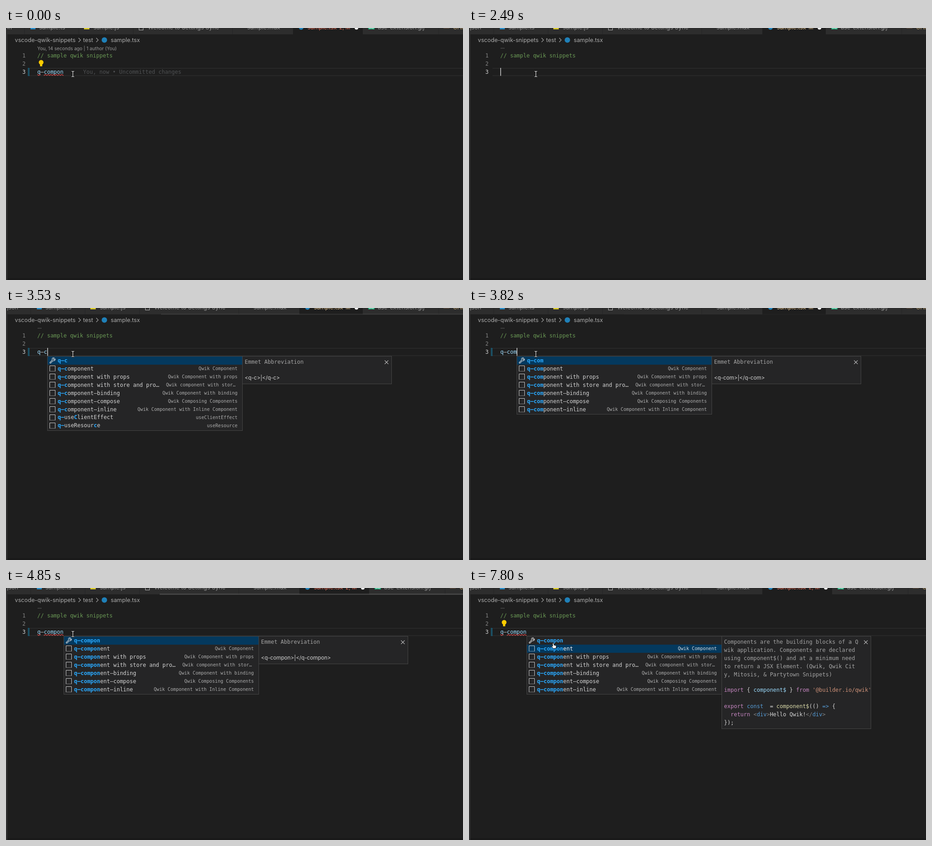
Animation of 1008x556 px, one loop 8 s. Source, as an HTML page with a canvas:

```html
<!DOCTYPE html>
<html lang="en">
<head>
<meta charset="utf-8">
<title>Snippet completion</title>
<style>
html, body { margin: 0; width: 100%; height: 100%; overflow: hidden; background: #1e1e1e; }
canvas { display: block; }
</style>
</head>
<body>
<canvas id="stage" width="1008" height="556"></canvas>
<script>
const ctx = document.getElementById('stage').getContext('2d');
const LOOP = 8000;
const CH = 7.224, LEFT = 69, ROW = 17.95;
const MONO = '12px "DejaVu Sans Mono", monospace';
const BOLD = 'bold ' + MONO;
const DETAIL = '10.2px "DejaVu Sans Mono", monospace';
const ui = (size, style = '') => `${style} ${size}px Inter, sans-serif`;
const SLIDER = 'rgba(121,121,121,0.4)';
const WORD = 'q-compon';

// [time, value] pairs; the latest one not after t holds.
const typedSteps = [[0, 8], [900, 7], [1040, 6], [1180, 5], [1330, 4], [1470, 3], [1610, 2],
  [1900, 1], [2200, 0], [3080, 1], [3380, 2], [3520, 3], [3670, 4], [3820, 5], [3970, 6],
  [4110, 7], [4410, 8]];
const caretSteps = [[0, 0], [600, 1], [2640, 0], [3080, 1], [4850, 0], [5440, 1], [5880, 0],
  [6330, 1], [6920, 0], [7360, 1], [7800, 0]];
const at = (steps, t) => steps.reduce((v, s) => (t >= s[0] ? s[1] : v), 0);
const during = (t, a, b) => t >= a && t < b;

const completions = [
  ['queueMicrotask', ''],
  ['q-$', '$ hook'],
  ['q-component', 'Qwik Component'],
  ['q-component with props', 'Qwik Component with props'],
  ['q-component with store and pro…', 'Qwik component with stor…'],
  ['q-component-binding', 'Qwik Component with binding'],
  ['q-component-compose', 'Qwik Composing Components'],
  ['q-component-inline', 'Qwik Component with Inline Component'],
  ['q-useClientEffect', 'useClientEffect'],
  ['q-useResource', 'useResource'],
  ['q-useServerMount', 'useServerMount'],
  ['q-useStore', 'useStore']
];

const KEY = '#c586c0', PLAIN = '#d4d4d4', BLUE = '#569cd6', TAG = '#808080';
const docText = [
  'Components are the building blocks of a Q',
  'wik application. Components are declared',
  'using component$() and at a minimum need',
  'to return a JSX Element. (Qwik, Qwik Cit',
  'y, Mitosis, & Partytown Snippets)'
];
const docCode = [
  [['import', KEY], [' { ', PLAIN], ['component$', '#9cdcfe'], [' } ', PLAIN], ['from', KEY],
    [" '@builder.io/qwik'", '#ce9178']],
  [],
  [['export', KEY], [' const', BLUE], ['  = ', PLAIN], ['component$', '#dcdcaa'], ['(() ', PLAIN],
    ['=>', BLUE], [' {', PLAIN]],
  [['  return', KEY], [' <', TAG], ['div', BLUE], ['>', TAG], ['Hello Qwik!', PLAIN], ['</', TAG],
    ['div', BLUE], ['>', TAG]],
  [['});', PLAIN]]
];

function text(str, x, y, color, font = MONO, align = 'left') {
  ctx.font = font;
  ctx.fillStyle = color;
  ctx.textAlign = align;
  ctx.fillText(str, x, y);
}
// Code is set with a wide hyphen that fills its cell.
const wide = str => str.replace(/-/g, '–');

function box(x, y, w, h, color) {
  ctx.fillStyle = color;
  ctx.fillRect(x, y, w, h);
}
function disc(x, y, r, color) {
  ctx.fillStyle = color;
  ctx.beginPath();
  ctx.arc(x, y, r, 0, Math.PI * 2);
  ctx.fill();
}
function line(points, color, width = 1) {
  ctx.strokeStyle = color;
  ctx.lineWidth = width;
  ctx.beginPath();
  points.forEach(([x, y], i) => (i ? ctx.lineTo(x, y) : ctx.moveTo(x, y)));
  ctx.stroke();
}
function panel(x, y, w, h) {
  box(x, y, w, h, '#252526');
  ctx.strokeStyle = '#454545';
  ctx.lineWidth = 1;
  ctx.strokeRect(x + 0.5, y + 0.5, w - 1, h - 1);
}
function clipped(x, y, w, h, draw) {
  ctx.save();
  ctx.beginPath();
  ctx.rect(x, y, w, h);
  ctx.clip();
  draw();
  ctx.restore();
}
function runs(x, y, parts) {
  for (const [str, color] of parts) {
    text(wide(str), x, y, color);
    x += str.length * CH;
  }
}

function drawTabs(t) {
  const errors = !during(t, 2490, 4700);
  const shift = t < 2490 ? 0 : 14;
  const rest = errors ? shift : shift - 14;
  const grey = '#969696', base = 2.8, font = ui(12.7), height = 14;
  box(0, 0, 1008, height, '#2d2d2d');
  [40, 160, 280, 499].forEach(x => box(x + shift, 0, 1, height, '#252526'));
  box(954 + rest, 0, 1, height, '#252526');
  box(633 + shift, 0, 154 + rest - shift, height, '#1e1e1e');

  text('package.json', 13 + shift, base, grey, font, 'right');
  box(54 + shift, 0, 11, 3, '#2a8ac4');
  text('sample.ts', 73 + shift, base, grey, font);
  box(172 + shift, 0, 12, 3, '#d8c92c');
  text('sample.js', 193 + shift, base, grey, font);
  ctx.strokeStyle = '#b5b5b5';
  ctx.lineWidth = 1;
  ctx.strokeRect(293.5 + shift, -5.5, 9, 10);
  text('Welcome to Settings Sync', 313 + shift, base, grey, font);
  text('sample.mdx', 532 + shift, base, grey, font);

  const active = errors ? '#e8725c' : '#e2c08d';
  disc(651 + shift, -1, 5, '#1f80b8');
  text('sample.tsx', 665 + shift, base, active, font);
  text(errors ? '2, M' : 'M', 735 + shift, base, active, ui(11.7));
  disc(773 + rest, -0.5, 4, '#f0f0f0');
  box(799 + rest, 0, 14, 3, '#20a878');
  line([[801 + rest, 1.5], [805 + rest, 0], [811 + rest, 1.5]], '#d9f3e9');
  text('use-extension.gif', 820 + rest, base, grey, ui(12.7, 'italic'));
  box(965 + rest, 0, 13, 1, '#6b5340');
  text('CHANGELOG.md', 986 + rest, base, '#b79c6d', font);

  const fade = start => Math.max(0, Math.min(1, 1 - (t - start) / 750));
  ctx.globalAlpha = during(t, 2640, 4700) ? fade(3140) : t >= 4700 ? fade(5130) : 0;
  box(errors ? 339 : 342, 12.5, 670, 2.5, SLIDER);
  ctx.globalAlpha = 1;
}

function drawBreadcrumb() {
  const grey = '#a9a9a9', font = ui(12.7);
  text('vscode-qwik-snippets', 19.5, 31, grey, font);
  text('test', 170, 31, grey, font);
  text('sample.tsx', 231, 31, grey, font);
  for (const x of [160, 199]) line([[x, 22], [x + 4.5, 26.5], [x, 31]], grey, 1.1);
  disc(217, 26.5, 6, '#1f80b8');
}

function squiggle(from, to) {
  clipped(from, 100, to - from, 7, () => {
    const points = [];
    for (let x = 66; x < 132; x += 3) points.push([x, x % 2 ? 102.4 : 104.8]);
    line(points, '#f14c4c', 1.1);
  });
}

function drawBulb() {
  disc(77.5, 75.7, 5.2, '#ffcc00');
  box(75, 79, 5, 5.5, '#ffcc00');
}

function drawEditor(t, count) {
  if (t < 2350) text('You, 14 seconds ago | 1 author (You)', LEFT, 48.5, '#999999', ui(10.2));
  else for (let i = 0; i < 3; i++) box(70.5 + i * 3, 44, 1.2, 1.2, '#999999');

  for (const y of [88, 104.2]) box(52, y, 956, 1.8, '#2a2a2a');
  [65, 83, 101].forEach((y, i) =>
    text(i + 1, 43.3, y, i === 2 ? '#d0d0d0' : '#858585', MONO, 'right'));
  text('// sample qwik snippets', LEFT, 65, '#6a9955');

  if (!during(t, 2350, 3230)) {
    clipped(48, 88, 4, 18, () => {
      for (let y = 84; y < 112; y += 3) line([[47, y + 4], [53, y - 2]], '#1b81a8', 1.2);
    });
  }
  const word = WORD.slice(0, count);
  runs(LEFT, 101, [[word.slice(0, 1), '#9cdcfe'], [word.slice(1, 2), PLAIN], [word.slice(2), '#9cdcfe']]);
  if (count && !during(t, 2200, 4700)) {
    squiggle(LEFT, LEFT + CH);
    if (count > 1) squiggle(83.5, Math.max(87, LEFT + count * CH));
  }
  if (t < 900) text('You, now • Uncommitted changes', 170, 101, '#4f5153');
  if (t < 900 || t >= 5290) drawBulb();
  if (at(caretSteps, t)) box(Math.round(LEFT + count * CH), 88, 1.5, 17.5, '#d0d0d0');
}

function snippetIcon(x, y) {
  line([[x + 0.5, y + 12], [x + 0.5, y + 0.5], [x + 12.5, y + 0.5], [x + 12.5, y + 12]], '#cccccc');
  for (let i = 0; i < 13; i += 2) box(x + i, y + 12, 1, 1, '#cccccc');
}
function cubeIcon(x, y) {
  const c = '#b180d7';
  line([[x + 6, y], [x + 12, y + 3], [x + 12, y + 10], [x + 6, y + 13], [x, y + 10], [x, y + 3],
    [x + 6, y], [x + 12, y + 3], [x + 6, y + 6], [x, y + 3]], c, 1.1);
  line([[x + 6, y + 6], [x + 6, y + 13]], c, 1.1);
}
function wrenchIcon(x, y) {
  line([[x + 9.5, y + 0.8], [x + 7, y + 1], [x + 5.5, y + 3.5], [x + 6, y + 6], [x + 0.8, y + 11],
    [x + 0.8, y + 12.4], [x + 2.5, y + 12.6], [x + 7.5, y + 7.5], [x + 10.5, y + 7.5],
    [x + 12.6, y + 5.2], [x + 12.4, y + 3.3], [x + 10, y + 5.4], [x + 8.2, y + 3.8],
    [x + 10.5, y + 1.5], [x + 9.5, y + 0.8]], '#dddddd', 1.1);
}

// Indices of the label's letters matched in order, or null.
function fuzzy(label, query) {
  const hits = [];
  let from = 0;
  for (const c of query) {
    const i = label.toLowerCase().indexOf(c, from);
    if (i < 0) return null;
    hits.push(i);
    from = i + 1;
  }
  return hits;
}

function drawRow(x, r, [label, detail], query, selected) {
  const top = 107 + r * ROW, base = 119.8 + r * ROW;
  if (selected) box(x + 1, top, 429, 18, '#04395e');
  const icon = r === 0 ? wrenchIcon : label === 'queueMicrotask' ? cubeIcon : snippetIcon;
  icon(x + 5, Math.round(top + 2));
  const hits = fuzzy(label, query);
  [...wide(label)].forEach((c, i) => {
    const hit = hits.includes(i);
    text(c, x + 23 + i * CH, base, hit ? '#2aaaff' : selected ? '#ffffff' : PLAIN, hit ? BOLD : MONO);
  });
  const right = x + (detail.endsWith('…') ? 415.3 : 419.7);
  text(detail, right, base - 0.4, selected ? '#d6dde3' : '#acacac', DETAIL, 'right');
}

function drawDocs(x, query, full, slider) {
  const left = x + 5.5;
  panel(x, 106, 330, full ? 205 : 62);
  if (full) {
    docText.forEach((str, i) => text(str, left, 123.3 + i * 18, '#a5a5a5'));
    clipped(x, 200, 329, 110, () => {
      docCode.forEach((parts, i) => runs(left, 229.3 + i * 18, parts));
      if (slider) box(x + 1, 300, 311, 10, SLIDER);
    });
  } else {
    text('Emmet Abbreviation', left, 123.3, '#a5a5a5');
    text(`<${query}>|</${query}>`, left, 158, '#d4d4d4', ui(11.7));
  }
  const cx = x + 318.3, cy = 119.7;
  line([[cx - 4, cy - 4], [cx + 4, cy + 4]], '#cccccc', 1.1);
  line([[cx + 4, cy - 4], [cx - 4, cy + 4]], '#cccccc', 1.1);
}

function drawSuggest(t, count) {
  const query = WORD.slice(0, count);
  const x = Math.round(LEFT + count * CH);
  const matches = completions.filter(([label]) => fuzzy(label, query));
  const rows = [[query, ''], ...matches].slice(0, 12);
  const browsing = t >= 6330;
  panel(x, 106, 431, Math.round(rows.length * ROW + 3));
  rows.forEach((row, r) => drawRow(x, r, row, query, r === (browsing ? 1 : 0)));
  if (matches.length > 11) box(x + 420, 107, 10, 32, SLIDER);
  drawDocs(x + 430, query, browsing, t < 7360);
}

function drawIBeam(x, y) {
  const stroke = (color, w) => {
    line([[x - 3, y - 6], [x - 1, y - 6], [x, y - 5], [x + 1, y - 6], [x + 3, y - 6]], color, w);
    line([[x, y - 5], [x, y + 5]], color, w);
    line([[x - 3, y + 6], [x - 1, y + 6], [x, y + 5], [x + 1, y + 6], [x + 3, y + 6]], color, w);
  };
  stroke('#111111', 3);
  stroke('#e6e6e6', 1.2);
}
function drawHand(x, y) {
  ctx.fillStyle = '#ffffff';
  ctx.strokeStyle = '#111111';
  ctx.lineWidth = 1;
  ctx.beginPath();
  [[-3, -5], [-1.5, -6], [0, -4], [0.5, -1.5], [4, -0.8], [5.5, 0.5], [5, 4], [4, 6], [-1, 6],
    [-3, 3.5], [-5, 0.8], [-4, 0], [-2, 1]].forEach(([dx, dy]) => ctx.lineTo(x + dx, y + dy));
  ctx.closePath();
  ctx.fill();
  ctx.stroke();
}

function draw(t) {
  const count = at(typedSteps, t);
  box(0, 0, 1008, 556, '#1e1e1e');
  drawTabs(t);
  drawBreadcrumb();
  drawEditor(t, count);
  box(0, 0, 3, 556, '#303031');
  box(3, 552, 1005, 4, '#191919');
  if (t >= 3080) drawSuggest(t, count);
  if (t < 6330) drawIBeam(147.5, 101.5);
  else drawHand(187, 127.5);
}

const start = performance.now();
function tick() {
  draw((performance.now() - start) % LOOP);
  requestAnimationFrame(tick);
}
tick();
</script>
</body>
</html>
```
